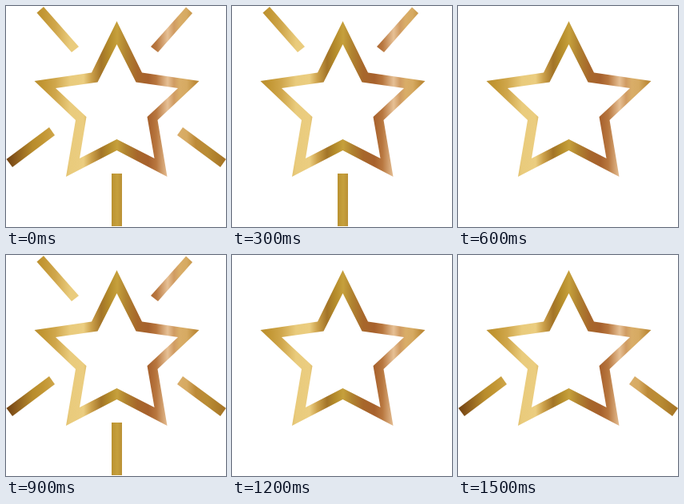
Write an HTML page that moves like this. It is 275x277 px and loops after 1800 ms.

```html
<!DOCTYPE html>
<html lang="en">
<head>
<meta charset="utf-8">
<title>Twinkling star</title>
<style>
  html, body { margin: 0; width: 100%; height: 100%; overflow: hidden; background: #fff; }
  svg { display: block; width: 100vw; height: 100vh; }
</style>
</head>
<body>
<svg viewBox="0 0 275 277" preserveAspectRatio="none">
  <defs>
    <linearGradient id="gold" gradientUnits="userSpaceOnUse" x1="0" y1="0" x2="275" y2="0"></linearGradient>
  </defs>
  <g fill="url(#gold)">
    <path fill-rule="evenodd" d="M138.5 19 170 83.500 241.500 94 189.500 143 201.500 214 138.500 181 75 214 87 143 35.500 94 107 83.500Z
      M138.500 48 114.500 95.500 62 103 100.500 139 92 191 138.500 167 185.500 191 176.500 139 215 103 162.500 95.500Z"/>
    <g id="upper">
      <path d="M38.500 8.500 47 1 91 51 82 58Z"/>
      <path d="M225 1.500 233 9 190 58 181 51Z"/>
    </g>
    <g id="lower">
      <path d="M.5 192 54 152 61 162 8 202Z"/>
      <path d="M221 152 275 192 268 202 214 162Z"/>
    </g>
    <path id="stem" d="M132 210H145V276H132Z"/>
  </g>
</svg>
<script>
const STEP = 300;
const POSES = ['upper lower stem', 'upper stem', '', 'upper lower stem', '', 'lower'];
const STOPS = [
  [0, '#6e3f10'], [12, '#8a5a1c'], [33, '#b88c2c'], [46, '#c29633'],
  [62, '#d0a74c'], [80, '#e9cb7c'], [97, '#ebcd80'], [107, '#cba04a'],
  [119, '#a37428'], [128, '#b38a2a'], [139, '#c6a03c'], [150, '#b08330'],
  [164, '#a7672b'], [178, '#a7612d'], [188, '#b8773f'], [202, '#e6c095'],
  [210, '#d09b62'], [217, '#d9ad68'], [226, '#d6aa62'], [237, '#bd8a38'],
  [252, '#b98c34'], [275, '#a47224']
];

document.getElementById('gold').innerHTML = STOPS
  .map(([x, color]) => `<stop offset="${x / 275}" stop-color="${color}"/>`).join('');

const rays = ['upper', 'lower', 'stem'].map(id => document.getElementById(id));

function draw(time) {
  const pose = POSES[Math.floor(time / STEP) % POSES.length].split(' ');
  for (const ray of rays) {
    ray.style.visibility = pose.includes(ray.id) ? 'visible' : 'hidden';
  }
}

const start = performance.now();
function tick() {
  draw(performance.now() - start);
  requestAnimationFrame(tick);
}
tick();
</script>
</body>
</html>
```
